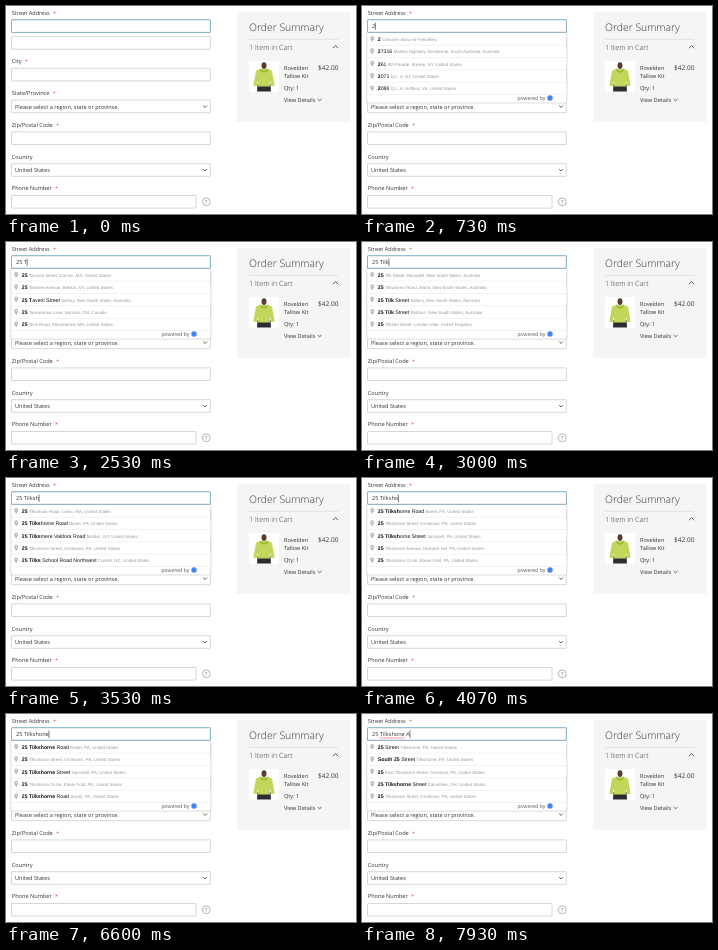
Recreate the animation shown at these times as an HTML page. Size 350x208 px, loop 8 s.

```html
<!DOCTYPE html>
<html lang="en">
<head>
<meta charset="utf-8">
<title>Checkout address autocomplete</title>
<style>
  html, body { margin: 0; width: 100%; height: 100%; overflow: hidden; background: #fff; }
  svg { display: block; width: 350px; height: 208px; }
  text { font: 5.6px "Open Sans", sans-serif; fill: #333; white-space: pre; text-rendering: geometricPrecision; }
  .box { fill: #fff; stroke: #bdbdbd; stroke-width: .6; }
  .focus { stroke: #5f97b8; filter: drop-shadow(0 0 .7px #68a8e0); }
  .star { font-size: 4.8px; fill: #e02b27; }
  .chev { fill: none; stroke: #333; stroke-width: .8; }
  .panel { fill: #fff; filter: drop-shadow(0 .8px 1px rgba(0, 0, 0, .3)); }
  .rule { stroke: #e4e4e4; stroke-width: .5; }
  .row { font: 5.2px Arial, "Liberation Sans", sans-serif; fill: #111; }
  .match { font-weight: 700; }
  .place { font-size: 4.4px; fill: #999; }
</style>
</head>
<body>
<svg viewBox="0 0 350 208">
  <g id="form"></g>

  <g id="help">
    <circle cx="200.3" cy="195.8" r="3.9" fill="none" stroke="#858585" stroke-width=".6"/>
    <text x="200.3" y="197.9" text-anchor="middle" style="fill:#757575">?</text>
  </g>

  <g id="summary">
    <rect x="231.4" y="6" width="112.8" height="110" fill="#f5f5f5"/>
    <text x="243" y="25.4" style="font-size:10.4px;font-weight:300">Order Summary</text>
    <path d="M243 33.3H332.4" stroke="#ccc" stroke-width=".5"/>
    <text x="243" y="43.6" style="font-size:7.2px;font-weight:300">1 Item in Cart</text>
    <path class="chev" d="M327 42.2l2.6-2.6 2.6 2.6"/>
    <rect x="243" y="55" width="30" height="30.5" fill="#fff"/>
    <path d="M251.5 78h13l.5 7.5h-14z" fill="#2b2b30"/>
    <path d="M254.6 62.5q3.4 1.6 6.8 0l4.6 2.2 2.6 14.8-3 .8-1.8-6 .2 6.2h-12l.2-6.2-1.8 6-3-.8 2.6-14.8z" fill="#c3d65a"/>
    <path d="M254.6 62.5q3.4 4.6 6.8 0l.4 2.4q-3.8 3.6-7.6 0z" fill="#a3b740"/>
    <ellipse cx="258" cy="59.6" rx="2.5" ry="3.4" fill="#5b3d30"/>
    <text x="278" y="64">Rovelden</text>
    <text x="278" y="71.9">Tallow Kit</text>
    <text x="332.4" y="63.8" text-anchor="end" style="font-size:6.5px">$42.00</text>
    <text x="278" y="83.6">Qty: 1</text>
    <text x="278" y="95.8">View Details</text>
    <path class="chev" d="M311.7 93l1.9 1.8 1.9-1.8" stroke-width=".6"/>
  </g>

  <text id="typed" x="10" y="22.3"></text>
  <path id="squiggle" fill="none" stroke="#e33" stroke-width=".7" stroke-dasharray="1 .4"/>
  <path id="caret" stroke="#222" stroke-width=".6"/>

  <g id="menu">
    <rect class="panel" x="5.2" y="26.8" width="199.2" height="69.8"/>
    <g id="lines"></g>
    <text x="155.6" y="93.7" style="font:5.4px Arial,'Liberation Sans',sans-serif;fill:#666">powered by</text>
    <circle cx="188" cy="92" r="2.7" fill="#4285f4"/>
  </g>
</svg>

<script>
const LOOP = 8000;
const $ = id => document.getElementById(id);

function add(parent, tag, attrs, text = "") {
  const el = document.createElementNS("http://www.w3.org/2000/svg", tag);
  for (const k in attrs) el.setAttribute(k, attrs[k]);
  el.textContent = text;
  parent.append(el);
  return el;
}

// Form fields
function box(y, width = 198.8, cls = "box") {
  add($("form"), "rect", { class: cls, x: 5.5, y, width, height: 12.6, rx: .4 });
}

function label(y, text, required) {
  const el = add($("form"), "text", { x: 5.8, y }, text);
  if (required) add(el, "tspan", { class: "star", dx: 3.5 }, "*");
}

function select(y, value) {
  add($("form"), "text", { x: 9, y: y + 8.4 }, value);
  add($("form"), "path", { class: "chev", d: `M197.2 ${y + 5.4}l1.9 1.9 1.9-1.9` });
}

label(8.8, "Street Address", true);
box(13.8, 198.8, "box focus");
box(30.6);
[["City", 1], ["State/Province", 1, "Please select a region, state or province."],
 ["Zip/Postal Code", 1], ["Country", 0, "United States"], ["Phone Number", 1]]
  .forEach(([name, required, value], i) => {
    const y = 57.1 + i * 31.8;
    label(y, name, required);
    box(y + 5.2, i === 4 ? 184.5 : 198.8);
    if (value) select(y + 5.2, value);
  });

// Suggestions: matched^rest|place
const US = ", United States", NSW = ", New South Wales, Australia";
const lists = [
  [730, ["2|Corvane, Basu-et-Tremelieu",
    "2^7316|Marlow Highway, Dunbarnie, South Australia, Australia",
    "2^61|9th Parade, Brelkin, NY" + US,
    "2^071|Q.L. 6, NJ" + US,
    "2^086|Q.L. 6, Hofferd, VA" + US]],
  [1170, ["25^1|Larkspindle Avenue, Wexmarrow, MA" + US,
    "25^30|Q.L. 6, Hofferd, VA" + US,
    "25^8|9th Parade, Brelkin, NY" + US,
    "25^04|Marlow Highway, Dunbarnie, South Australia, Australia",
    "25^66|Q.L. 6, NJ" + US]],
  [1800, ["25|Quellachusk Avenue, Wexmarrow, MA" + US,
    "25|Harmondwealt Avenue, Dorvex, MA" + US,
    "25|Brellon Street, Dorvex, MA" + US,
    "25|Q.L. 6, Sandury, MA" + US,
    "25|Duke Lane West, Norvalo, ON, Canada"]],
  [2530, ["25|Tavrock Street, Dorvex, MA" + US,
    "25|Tolmere Avenue, Brelkin, NY" + US,
    "25 T^averil Street|Sellory" + NSW,
    "25|Tamworrow Lane, Norvalo, ON, Canada",
    "25|Tesk Road, Wexmarrow, MA" + US]],
  [2800, ["25|Tilk Street, Ransdell" + NSW,
    "25|Tindrell Avenue, Brelkin, NY" + US,
    "25 Ti^lk Street|Sellory" + NSW,
    "25|Tivermore Road, Dorvex, MA" + US,
    "25 Ti^lk Street|Redlorn" + NSW]],
  [3000, ["25|Tilk Street, Ransdell" + NSW,
    "25|Tilkwarren Road, Marlo" + NSW,
    "25 Tilk^ Street|Sellory" + NSW,
    "25 Tilk^ Street|Redlorn" + NSW,
    "25|Tilkfold Street, Lunden Vale, United Kingdom"]],
  [3270, ["25|Tilksmoor Road, Lorex, MA" + US,
    "25 Tilks^horne Road|Barlet, PA" + US,
    "25 Tilks^mere Valdora Road|Maldec, NY" + US,
    "25|Tilkshorne Street, Orrintown, PA" + US,
    "25 Tilks^ School Road Northwest|Cordell, NC" + US]],
  [3800, ["25 Tilksh^orne Road|Barlet, PA" + US,
    "25|Tilkshorne Street, Orrintown, PA" + US,
    "25 Tilksh^orne Street|Sprindell, PA" + US,
    "25|Tilkshorne Avenue, Norbeck Hill, PA" + US,
    "25|Tilkshorne Circle, Elmer Fold, PA" + US]],
  [4630, ["25 Tilkshorne^ Road|Barlet, PA" + US,
    "25|Tilkshorne Street, Orrintown, PA" + US,
    "25 Tilkshorne^ Street|Sprindell, PA" + US,
    "25|Tilkshorne Circle, Elmer Fold, PA" + US,
    "25 Tilkshorne^ Road|Sorvill, PA" + US]],
  [7930, ["25^ Street|Tilkshorne, PA" + US,
    "South 25^ Street|Tilkshorne, PA" + US,
    "25|East Tilkshorne Street, Grenlock, PA" + US,
    "25 Tilkshorne^ Street|Calumbrie, OH" + US,
    "25|Tilkshorne Street, Orrintown, PA" + US]],
];

const ROW = 12.36;
for (let i = 0; i < 5; i++) {
  const y = 26.8 + i * ROW;
  add($("lines"), "path", { class: "rule", d: `M5.2 ${y + ROW}H204.4` });
  add($("lines"), "path", {
    d: `M10.2 ${y + 9}q-1.9-2.6-1.9-3.9a1.9 1.9 0 0 1 3.8 0q0 1.3-1.9 3.9z`, fill: "#b4b4b4" });
  add($("lines"), "circle", { cx: 10.2, cy: y + 5.1, r: .7, fill: "#fff" });
}

const groups = lists.map(([, rows]) => {
  const g = add($("menu"), "g", {});
  rows.forEach((row, i) => {
    const [main, place] = row.split("|"), [match, rest = ""] = main.split("^");
    const el = add(g, "text", { class: "row", x: 15.8, y: 35 + i * ROW });
    add(el, "tspan", { class: "match" }, match);
    if (rest) add(el, "tspan", {}, rest);
    add(el, "tspan", { class: "place", dx: 1.3 }, place);
  });
  return g;
});

// Typing: [time, number of characters]
const query = "25 Tilkshone A";
const keys = [[0, 0], [400, 1], [870, 2], [1470, 3], [2470, 4], [2730, 5], [2870, 6], [3000, 7],
  [3200, 8], [3530, 9], [4000, 10], [4330, 11], [5130, 12], [7070, 13], [7670, 14]];
const blinks = [[0, 400], [2200, 2470], [6000, 6600]];

const typed = $("typed"), caret = $("caret"), squiggle = $("squiggle");
const show = (el, on) => el.setAttribute("display", on ? "inline" : "none");
const indexAt = (steps, t) => steps.filter(s => s[0] <= t).length - 1;

function render(t) {
  const text = query.slice(0, keys[indexAt(keys, t)][1]);
  if (typed.textContent !== text) typed.textContent = text;
  const end = 10.2 + (text ? typed.getComputedTextLength() : 0);
  caret.setAttribute("d", `M${end} 16.6V24`);
  show(caret, !blinks.some(([a, b]) => t >= a && t < b));

  const marked = text.length > 12;
  show(squiggle, marked);
  if (marked) {
    const x = 10 + typed.getSubStringLength(0, 3);
    squiggle.setAttribute("d", `M${x} 24H${x + typed.getSubStringLength(3, 9)}`);
  }

  const current = indexAt(lists, t);
  show($("menu"), current >= 0);
  groups.forEach((g, i) => show(g, i === current));
}

const start = performance.now();
function tick() {
  render((performance.now() - start) % LOOP);
  requestAnimationFrame(tick);
}
tick();
</script>
</body>
</html>
```
